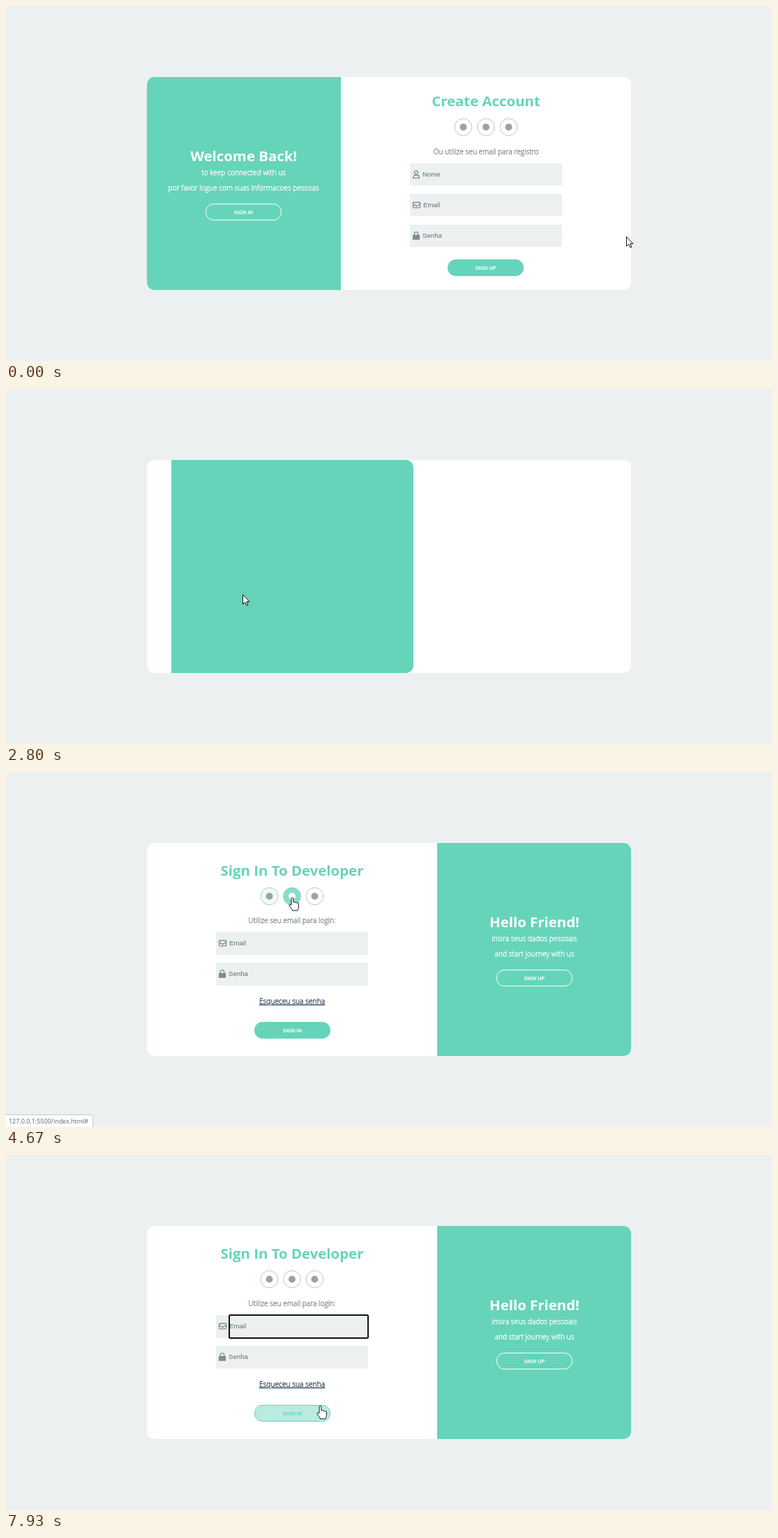
Recreate the animation shown at these times as an HTML page. Size 1098x510 px, loop 8000 ms.

```html
<!DOCTYPE html>
<html lang="pt">
<head>
<meta charset="utf-8">
<title>Sign in / sign up</title>
<style>
html, body { margin: 0; height: 100%; overflow: hidden; background: #ecf0f1; }
svg { display: block; }
text { text-anchor: middle; }
.p { font: 300 10.25px "Open Sans", sans-serif; stroke-width: .35; }
.h { font: 700 20.4px "Open Sans", sans-serif; }
.b { font: 700 7.2px "Liberation Sans", Arial, sans-serif; }
.i { font: 9.65px "Liberation Sans", Arial, sans-serif; text-anchor: start; }
.s { font: 8.95px "Open Sans", sans-serif; text-anchor: start; }
</style>
</head>
<body>
<svg id="stage" width="1098" height="510" viewBox="0 0 1098 510"></svg>
<script>
const LOOP = 8000, FPS = 15, SWITCH = 2465, SLIDE = 1353, FADE = 500;
const TEAL = '#66d4ba', GREY = '#7f8c8d', PALE = '#ecf0f1';
const CARD = { x: 202, y: 102, w: 694, h: 306, r: 10.8 };
const IDLE = { on: false, amount: 0 };
const stage = document.getElementById('stage');

// Pointer moves: start time and where each one ends
const moves = [
  [470, 935, 327], [1470, 339, 295], [3330, 362, 206], [3610, 377, 183],
  [4270, 410, 180], [4930, 443, 181], [5290, 551, 220], [5520, 435, 386],
  [6250, 444, 270], [6600, 449, 287], [6930, 449, 250], [7470, 450, 360]
];
// Sliding panel: left and width, in percent of the card
const slide = [[0, 40], [5, 50], [25, 60], [45, 50], [60, 40]];

const mix = (a, b, k) => a + (b - a) * k;
const clamp = v => Math.max(0, Math.min(1, v));

// CSS "ease" curve
function ease(x) {
  let lo = 0, hi = 1, s = .5;
  for (let i = 0; i < 24; i++) {
    s = (lo + hi) / 2;
    if (.75 * s * (1 - s) + s ** 3 < clamp(x)) lo = s; else hi = s;
  }
  return .3 * (1 - s) ** 2 * s + 3 * (1 - s) * s * s + s ** 3;
}

// Longer ways take longer
function pointerAt(t) {
  let x = 889, y = 331;
  for (const [start, toX, toY] of moves) {
    const k = clamp((t - start) / (170 + .85 * Math.hypot(toX - x, toY - y)));
    const smooth = k * k * (3 - 2 * k);
    x = mix(x, toX, smooth);
    y = mix(y, toY, smooth);
    if (k < 1) break;
  }
  return [x, y];
}

function panelAt(t) {
  const p = clamp((t - SWITCH) / SLIDE) * 4, i = Math.min(3, Math.floor(p)), k = ease(p - i);
  const [left, width] = [0, 1].map(n => mix(slide[i][n], slide[i + 1][n], k) / 100 * CARD.w);
  return [Math.round(CARD.x + left), Math.round(CARD.x + left + width)];
}

// Hover from a to b: whether it is on, and the faded amount
function hover(t, a, b) {
  const amount = ease((Math.min(t, b) - a) / FADE) * (1 - ease((t - b) / FADE));
  return { on: t >= a && t < b, amount };
}

const text = (x, y, str, fill, cls = 'p', more = '') =>
  `<text x="${x}" y="${y}" fill="${fill}" class="${cls}" ${cls === 'p' ? `stroke="${fill}"` : ''} ${more}>${str}</text>`;
const rect = (x, y, w, h, fill, more = '') =>
  `<rect x="${x}" y="${y}" width="${w}" height="${h}" fill="${fill}" ${more}/>`;

const icons = {
  Nome: '<circle cx="5" cy="-2.8" r="2.6"/><path d="M.6 5.2V4a3 3 0 0 1 3-3h2.8a3 3 0 0 1 3 3v1.2z"/>',
  Email: '<rect x=".6" y="-4" width="10" height="7.8" rx="1"/><path d="M.8-1.8 5.6 1.6 10.4-1.8"/>',
  Senha: `<path d="M2.3-.5V-2.6a2.7 2.7 0 0 1 5.4 0V-.5"/><rect x=".6" y="-.5" width="8.8" height="5.6" fill="${GREY}"/>`
};

const field = (x, y, h, label) => rect(x, y, 218, h, PALE) +
  `<g transform="translate(${x + 4} ${y + 16})" fill="none" stroke="${GREY}" stroke-width="1.3">${icons[label]}</g>` +
  text(x + (label === 'Email' ? 19 : 18), y + 19.3, label, '#666a6c', 'i');

const social = (x, y, { on, amount } = IDLE) =>
  `<circle cx="${x}" cy="${y}" r="12.3" fill="${TEAL}" fill-opacity="${amount}" stroke="${on ? TEAL : '#bdc3c7'}"/>
   <circle cx="${x}" cy="${y}" r="5" fill="${on ? '#fff' : '#95a5a6'}"/>`;

function button(x, y, label, line, base, { on, amount } = IDLE) {
  const box = (fill, more = '') => rect(x + .5, y + .5, 108, 23, fill, `rx="10.8" ${more}`);
  return box(base) + box('#fff', `fill-opacity="${amount}" stroke="${line}"`) +
    text(x + 54.5, y + 14.5, label, on ? TEAL : '#fff', 'b');
}

const signUpForm = () =>
  text(688, 143.5, 'Create Account', TEAL, 'h') +
  [0, 1, 2].map(i => social(655.5 + 32.5 * i, 174)).join('') +
  text(688, 213, 'Ou utilize seu email para registro', GREY) +
  ['Nome', 'Email', 'Senha'].map((label, i) => field(579, 226 + 44 * i, 32, label)).join('') +
  button(633, 364, 'SIGN UP', TEAL, TEAL);

function signInForm(t) {
  const ring = (x, y) => rect(x, y, 519 - x, 33, 'none', 'rx="1.5" stroke="#101010" stroke-width="2"');
  const visits = [[3733, 4350], [4430, 4960], [5030, 5310]];
  return text(410, 148.5, 'Sign In To Developer', TEAL, 'h') +
    visits.map(([a, b], i) => social(377.5 + 32.5 * i, 178.5, hover(t, a, b))).join('') +
    text(410, 217, 'Utilize seu email para login:', GREY) +
    ['Email', 'Senha'].map((label, i) => field(301, 230 + 44 * i, 33, label)).join('') +
    (t >= 7130 ? ring(320, 230) : t >= 6860 ? ring(318, 274) : '') +
    text(410, 333, 'Esqueceu sua senha', '#34495e', 'p', 'text-decoration="underline"') +
    button(356, 359, 'SIGN IN', TEAL, TEAL, t < 7000 ? hover(t, 5800, 6300) : hover(t, 7773, LOOP));
}

const greeting = (x, title, line1, line2) =>
  text(x, 223.3, title, '#fff', 'h') + text(x, 243, line1, '#fff') + text(x, 265, line2, '#fff');

const welcome = t =>
  greeting(340.7, 'Welcome Back!', 'to keep connected with us', 'por favor logue com suas informacoes pessoas') +
  button(286, 284, 'SIGN IN', '#fff', 'none', hover(t, 1950, LOOP));

const hello = () =>
  greeting(757.5, 'Hello Friend!', 'insira seus dados pessoais', 'and start journey with us') +
  button(703, 284, 'SIGN UP', '#fff', 'none');

// Only the outer side of the panel is rounded
function panel(left, right, signIn) {
  const { y, h, r } = CARD, arc = `a${r} ${r} 0 0 ${signIn ? 1 : 0} `;
  const [flat, round, dir] = signIn ? [left, right, 1] : [right, left, -1];
  return `<path fill="${TEAL}" d="M${flat} ${y}H${round - dir * r}${arc}${dir * r} ${r}V${y + h - r}${arc}${-dir * r} ${r}H${flat}z"/>`;
}

function cursor(x, y, signIn, left) {
  const inside = (x0, y0, w, h) => x >= x0 && x <= x0 + w && y >= y0 && y <= y0 + h;
  const open = signIn && x < left;
  const hand = open && (inside(365, 166, 90, 25) || inside(364, 323, 93, 14) || inside(356, 359, 109, 24));
  const beam = signIn
    ? open && [230, 274].some(top => inside(301, top, 218, 33))
    : [226, 270, 314].some(top => inside(579, top, 218, 32));
  const shape = hand
    ? 'M-1.5 10.5V1.5a1.5 1.5 0 0 1 3 0V6.5q2-.7 2.6.6 2-.6 2.5.6 2.4-.4 2.4 1.2V13c0 3-1 3.2-1.5 5.5H0c-.5-2-2.5-4-4.4-7-.6-1.8 1.2-2.6 2.9-1z'
    : beam ? 'M-3-6.5H3M0-6V6M-3 6.5H3'
    : 'M0 0V13.6L3.2 10.8 5.4 15.6 7.4 14.7 5.3 10H9.4z';
  return `<path transform="translate(${Math.round(x) + .5} ${Math.round(y) + .5})" d="${shape}" fill="#fff" stroke="#111"/>`;
}

function statusBar(t) {
  const alpha = Math.min(clamp((t - 4150) / 250), clamp((5750 - t) / 250));
  return `<g opacity="${alpha}"><path d="M-1 492.5H121.5q3 0 3 3V511H-1z" fill="#fff" stroke="#c6c9ca"/>` +
    text(4, 505.3, '127.0.0.1:5500/index.html#', '#5f6368', 's') + '</g>';
}

function draw(t) {
  const signIn = t > SWITCH + 5, [left, right] = panelAt(t), [x, y] = pointerAt(t);
  stage.innerHTML = rect(CARD.x, CARD.y, CARD.w, CARD.h, '#fff', `rx="${CARD.r}"`) +
    (signIn ? signInForm(t) : signUpForm()) + panel(left, right, signIn) +
    (signIn ? hello() : welcome(t)) + statusBar(t) + cursor(x, y, signIn, left);
}

// The picture advances in steps of 1/15 s
let start, shown = -1;
function tick(now) {
  start ??= now;
  const step = Math.floor(((now - start) % LOOP + 5) * FPS / 1000) % (LOOP * FPS / 1000);
  if (step !== shown) draw((shown = step) * 1000 / FPS);
  requestAnimationFrame(tick);
}
draw(0);
requestAnimationFrame(tick);
</script>
</body>
</html>
```
